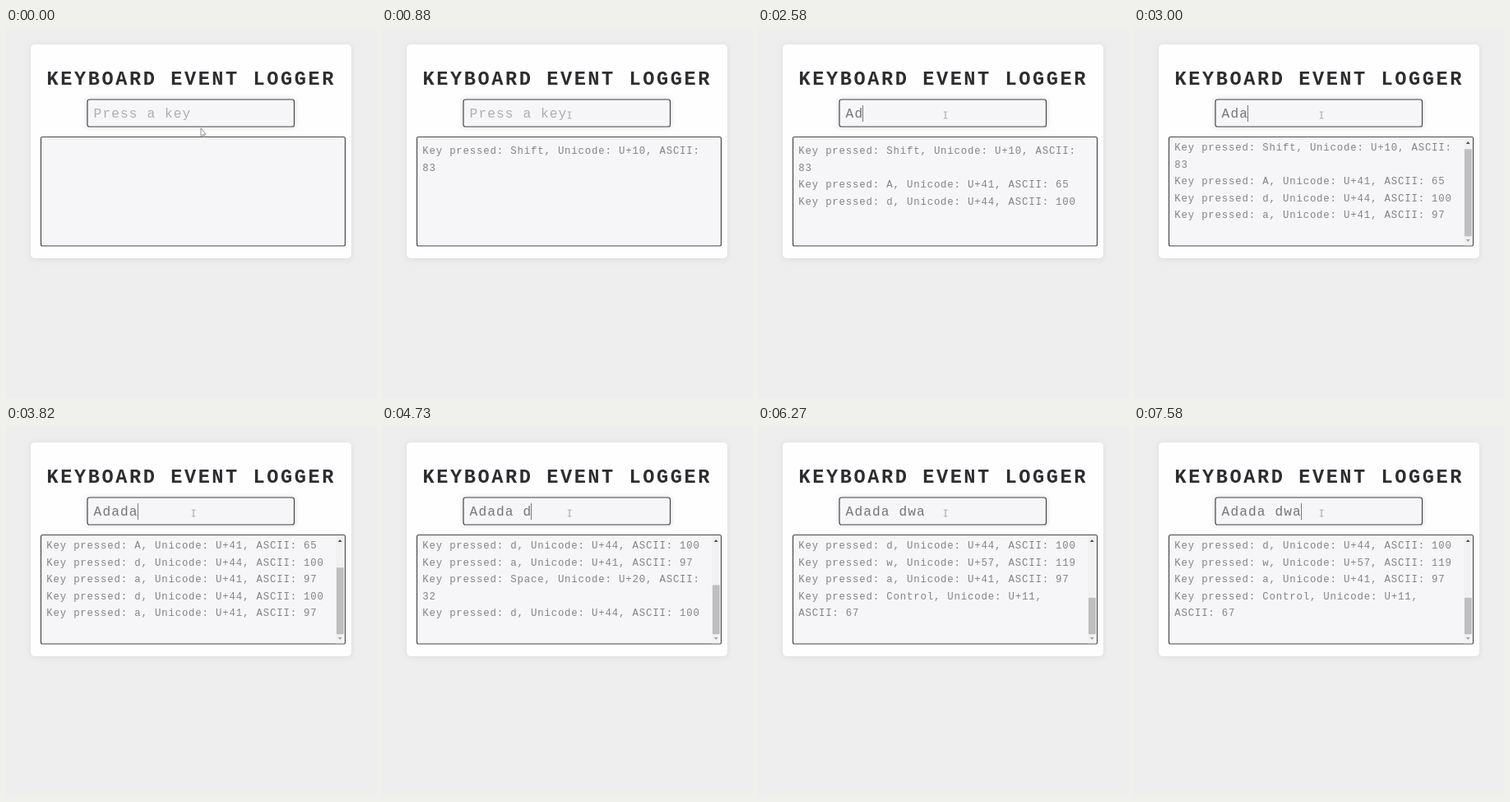
An HTML page for the animation above (8 s loop, 450 by 450 pixels).

```html
<!DOCTYPE html>
<html lang="en">
<head>
<meta charset="utf-8">
<title>Keyboard Event Logger</title>
<style>
  html, body { margin: 0; width: 100%; height: 100%; overflow: hidden; background: #eee; }
  svg { display: block; width: 100vw; height: 100vh; }
  text { font-family: "Liberation Mono", "Courier New", monospace; letter-spacing: .067em; white-space: pre; }
  .card { fill: #fefefe; filter: drop-shadow(0 1px 4px rgba(0, 0, 0, .08)); }
  .field { fill: #f6f6f9; stroke: #48484c; stroke-width: 1.2; }
  .title { font-size: 23.6px; font-weight: bold; letter-spacing: .109em; fill: #2d2d31; }
  .entry { font-size: 16.2px; }
  .log { font-size: 12.35px; fill: #848486; }
</style>
</head>
<body>
<svg viewBox="0 0 450 450">
  <rect class="card" x="30" y="20" width="390" height="260" rx="5"/>
  <text class="title" x="49.6" y="68.6">KEYBOARD EVENT LOGGER</text>
  <rect class="field" x="99" y="87" width="251.5" height="33" rx="2.5"
        style="filter: drop-shadow(0 0 3px rgba(0, 0, 0, .15))"/>
  <text class="entry" id="entry" x="106.6" y="109"></text>
  <rect id="caret" y="94" width="1" height="20" fill="#77777b"/>

  <rect class="field" x="42.5" y="132.5" width="370" height="132.5" rx="2"/>
  <clipPath id="logClip"><rect x="43" y="138" width="358" height="126"/></clipPath>
  <g class="log" id="log" clip-path="url(#logClip)"></g>
  <g id="scrollbar">
    <rect x="401" y="133.3" width="10.7" height="131" fill="#f1f1f2"/>
    <rect id="thumb" x="402" width="8.8" fill="#bfbfc0"/>
    <path d="M403.7 141 L406.2 138 L408.7 141Z" fill="#505050"/>
    <path d="M403.7 257 L406.2 260 L408.7 257Z" fill="#a3a3a3"/>
  </g>

  <path id="arrow" d="M0 0 V9.6 L2.1 7.6 L3.5 10.9 L4.9 10.3 L3.5 7.1 H6.2Z"
        fill="#fff" stroke="#77777b" stroke-width=".8"/>
  <path id="beam" d="M-2.2 -4 H-.6 L0 -3.4 L.6 -4 H2.2 M0 -3.4 V3.4 M-2.2 4 H-.6 L0 3.4 L.6 4 H2.2"
        fill="none" stroke="#8c8c90" stroke-width=".8"/>
</svg>

<script>
const LOOP = 8000;
const LINE = 20.5;
const WRAP = 41;
const CHAR = 10.82;

// [time, key name, key code]
const keys = [
  [880, "Shift", 16], [1180, "A", 65], [2580, "d", 68], [3000, "a", 65],
  [3420, "d", 68], [3790, "a", 65], [4300, "Space", 32], [4730, "d", 68],
  [4970, "w", 87], [5450, "a", 65], [6270, "Control", 17]
];
const caretToggles = [210, 700, 1180, 1700, 2240, 6000, 6550, 7060, 7580];

const el = id => document.getElementById(id);
const [entry, caret, log, scrollbar, thumb, arrow, beam] =
  ["entry", "caret", "log", "scrollbar", "thumb", "arrow", "beam"].map(el);
const show = (node, on) => node.setAttribute("visibility", on ? "visible" : "hidden");

function wrap(text) {
  const lines = [""];
  for (const word of text.split(" ")) {
    const last = lines.length - 1;
    const joined = lines[last] ? lines[last] + " " + word : word;
    if (joined.length > WRAP) lines.push(word);
    else lines[last] = joined;
  }
  return lines;
}

function describe([, name, code]) {
  const ascii = name === "Space" ? 32 : name.charCodeAt(0);
  return wrap(`Key pressed: ${name}, Unicode: U+${code.toString(16)}, ASCII: ${ascii}`);
}

const typed = ([, name]) => name === "Space" ? " " : name.length === 1 ? name : "";

let shownKeys = -1;
function drawKeys(pressed) {
  if (pressed.length === shownKeys) return;
  shownKeys = pressed.length;

  const value = pressed.map(typed).join("");
  entry.textContent = value || "Press a key";
  entry.setAttribute("fill", value ? "#757579" : "#adadb0");
  caret.setAttribute("x", Math.floor(106.2 + CHAR * value.length));

  const lines = pressed.flatMap(describe);
  const scrolls = lines.length > 4;
  const first = scrolls ? 231.2 - LINE * (lines.length - 1) : 153.2;
  log.replaceChildren(...lines.map((line, i) => {
    const text = document.createElementNS("http://www.w3.org/2000/svg", "text");
    text.setAttribute("x", 49.2);
    text.setAttribute("y", first + LINE * i);
    text.textContent = line;
    return text;
  }));

  show(scrollbar, scrolls);
  const size = Math.min(106, 14053 / (30 + LINE * lines.length));
  thumb.setAttribute("y", 253.3 - size);
  thumb.setAttribute("height", size);
}

function drawPointer(t) {
  const p = Math.min(1, Math.floor(t / 30) / 6);
  const x = 237 - 9 * p, y = 122 - 16 * p;
  const overField = y < 120;
  for (const node of [arrow, beam]) node.setAttribute("transform", `translate(${x} ${y})`);
  show(arrow, !overField);
  show(beam, overField);
}

function draw(t) {
  drawKeys(keys.filter(key => key[0] <= t));
  show(caret, caretToggles.filter(time => time <= t).length % 2 === 1);
  drawPointer(t);
}

const start = performance.now();
function frame() {
  draw((performance.now() - start) % LOOP);
  requestAnimationFrame(frame);
}
frame();
</script>
</body>
</html>
```
